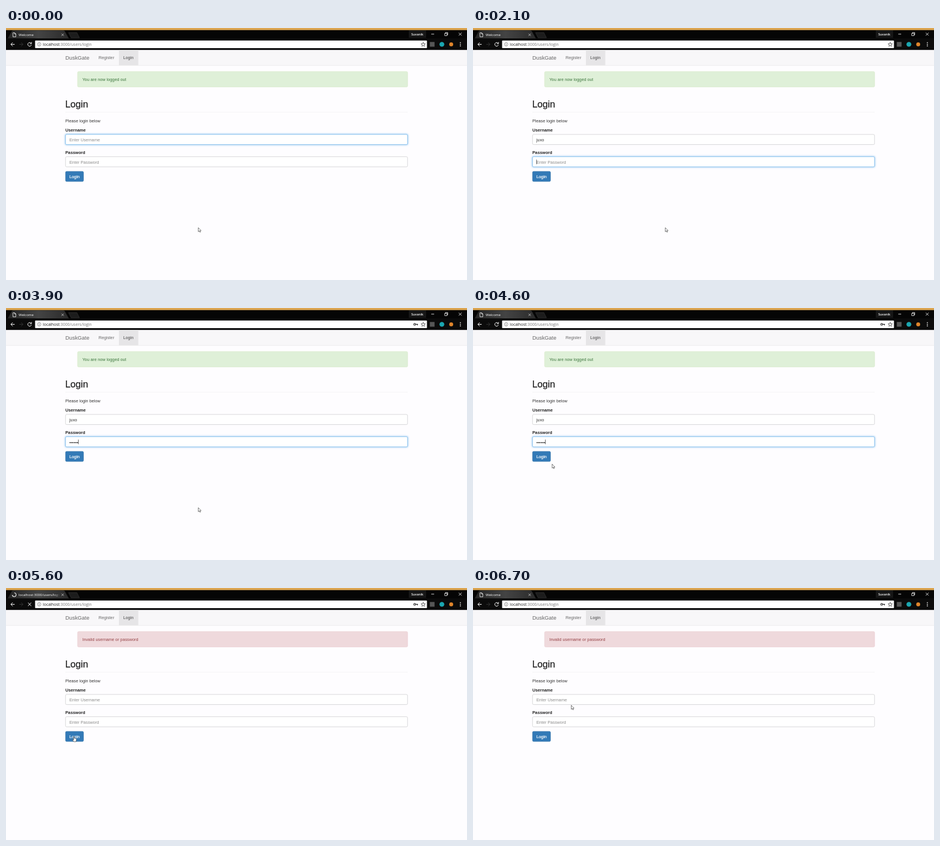
An HTML page that plays this animation: 800x438 px, repeating every 6800 ms.

```html
<!DOCTYPE html>
<html lang="en">
<head>
<meta charset="utf-8">
<title>Login form</title>
<style>
  html, body { margin: 0; width: 100%; height: 100%; overflow: hidden; background: #fefdff; }
  svg { display: block; width: 800px; height: 438px; }
  text { white-space: pre; }
  .page { font: 7.29px "Liberation Sans", Arial, sans-serif; fill: #333; }
  .ui { font: 6px "Open Sans", sans-serif; fill: #fff; }
  .bold { font-weight: bold; fill: #222; }
  .hint { fill: #8c8c8c; }
  .line { fill: none; stroke: #fff; stroke-width: 1; }
  .pointer { fill: #fff; stroke: #222; stroke-width: .6; stroke-linejoin: round; }
  .field { fill: #fff; stroke-width: .7; }
</style>
</head>
<body>
<svg viewBox="0 0 800 438">
  <defs>
    <linearGradient id="tabFill" x1="0" y1="0" x2="1" y2="0">
      <stop offset="0" stop-color="#242424"/><stop offset=".5" stop-color="#444"/><stop offset="1" stop-color="#2b2b2b"/>
    </linearGradient>
    <linearGradient id="fade" gradientUnits="userSpaceOnUse" x1="84" y1="0" x2="93" y2="0">
      <stop offset="0" stop-color="#fff"/><stop offset="1" stop-color="#fff" stop-opacity="0"/>
    </linearGradient>
    <filter id="blur" x="-5%" y="-50%" width="110%" height="200%"><feGaussianBlur stdDeviation="1.4"/></filter>
  </defs>

  <!-- browser window -->
  <rect width="800" height="438" fill="#fefdff"/>
  <rect width="800" height="38.3" fill="#050505"/>
  <rect width="800" height="3.7" fill="#dca550"/>
  <path d="M3 18 L10 5.5 Q11 4.3 13 4.3 H99 Q101 4.3 102 5.5 L109 18Z" fill="url(#tabFill)"/>
  <path d="M108.5 8 H123 L127.5 17 H113Z" fill="#1c1c1c" stroke="#3a3a3a" stroke-width=".6"/>
  <rect y="18" width="800" height="20.3" fill="#0b0b0b"/>
  <path id="doc" class="line" d="M12 8.3 H15 L17 10.3 V15.3 H12Z M15 8.3 V10.3 H17" style="stroke-width:.8"/>
  <circle id="spinner" class="line" cx="14.2" cy="11.7" r="3.3" stroke-dasharray="14.5 7"/>
  <text id="title" class="ui" x="22" y="14" style="fill:url(#fade)"></text>
  <path class="line" d="M96.3 9.8 l4 4 m0 -4 l-4 4" style="stroke:#ccc;stroke-width:.8"/>
  <rect x="699" y="4" width="30" height="13" fill="#171717"/>
  <text class="ui" x="703.3" y="12.7" style="font-size:5.5px;font-weight:600">Suvanik</text>
  <path class="line" d="M738 10.6 h5 M761.3 9.3 h4 v4 h-4Z M762.6 9.3 v-1.4 h4 v4 h-1.3 M785.7 8.2 l5 5 m0 -5 l-5 5" style="stroke-width:.8"/>

  <path class="line" d="M15 28.4 H8.6 M11.6 25.2 L8.4 28.4 L11.6 31.6"/>
  <path class="line" d="M23 28.4 H29.4 M26.4 25.2 L29.6 28.4 L26.4 31.6" style="stroke:#333"/>
  <path id="reload" class="line" d="M43.4 26.3 A3.2 3.2 0 1 0 44.1 29.3 M44.2 24.5 V27.3 H41.4"/>
  <path id="stop" class="line" d="M38.2 25.6 l5.6 5.6 m0 -5.6 l-5.6 5.6"/>
  <rect x="50.5" y="21.8" width="680" height="13.2" rx="1" fill="#fff"/>
  <circle cx="57.6" cy="28.4" r="3" fill="none" stroke="#666" stroke-width=".7"/>
  <path d="M57.6 26.5 v.8 M57.6 28 v2.1" stroke="#666" stroke-width=".8"/>
  <text class="ui" x="64" y="31" style="font-size:6.92px;fill:#777"><tspan fill="#222">localhost</tspan>:3000/users/login</text>
  <g id="key" fill="none" stroke="#333" stroke-width="1.2">
    <circle cx="709.2" cy="28.4" r="1.6"/><path d="M710.8 28.4 H715 M713.8 28.4 v1.8"/>
  </g>
  <path id="star" fill="none" stroke="#444" stroke-width=".8"/>
  <rect x="735.5" y="24.3" width="8.2" height="8.2" fill="#565656"/>
  <circle cx="756.4" cy="28.4" r="4.2" fill="#1ba6b0"/>
  <circle cx="772.6" cy="28.4" r="3.4" fill="#e0852b"/>
  <path d="M788.5 24.8 v1.5 m0 1.4 v1.5 m0 1.4 v1.5" stroke="#fff" stroke-width="1.5"/>

  <!-- web page -->
  <g class="page">
    <rect y="38.3" width="800" height="26.7" fill="#f8f7f9"/>
    <path d="M0 65.1 H800" stroke="#e5e4e6" stroke-width=".7"/>
    <rect x="196" y="38.3" width="33.6" height="26.5" fill="#e6e5e7"/>
    <text x="103" y="54.7" style="font-size:9.375px" fill="#666">DuskGate</text>
    <text x="160.7" y="54.2" fill="#666">Register</text>
    <text x="203.4" y="54.2" fill="#444">Login</text>

    <rect id="alert" x="124.2" y="75.7" width="572.8" height="26.8" rx="2" stroke-width=".6"/>
    <text id="message" x="132.4" y="91.7"></text>

    <text x="102.8" y="137.6" style="font-size:16.2px;stroke:#222;stroke-width:.25;fill:#222">Login</text>
    <path d="M103 146.2 H697" stroke="#ececee" stroke-width=".6"/>
    <text x="103" y="164.3">Please login below</text>
    <text class="bold" x="103" y="179.8">Username</text>
    <text class="bold" x="103" y="218.6">Password</text>
    <g id="fields"></g>

    <rect id="button" x="103.3" y="249.2" width="31.2" height="17.6" rx="2"/>
    <text x="110" y="260.8" style="fill:#fff;stroke:#fff;stroke-width:.2">Login</text>
  </g>

  <path id="arrow" class="pointer" d="M0 0 V7 L1.7 5.6 L2.8 8 L3.9 7.5 L2.8 5.2 H4.9Z"/>
  <path id="hand" class="pointer" d="M-.7 .6 Q0 -.4 .7 .6 V3.2 L3.6 3.9 Q4.4 4.2 4.2 5.4 L3.6 9 H-.4 L-2.8 5.8 Q-2.6 4.8 -1.6 5.4 L-.7 6.2Z"/>
</svg>

<script>
const LOOP = 6800, STEP = 100;
const USER = "juxo", PASSWORD_LENGTH = 6;
const $ = id => document.getElementById(id);
const clamp = v => Math.max(0, Math.min(1, v));
const ramp = (t, from, to) => clamp((t - from) / (to - from));
const show = (el, on) => el.setAttribute("visibility", on ? "visible" : "hidden");
const set = (el, attrs) => { for (const k in attrs) el.setAttribute(k, attrs[k]); };

function make(tag, attrs) {
  const el = document.createElementNS("http://www.w3.org/2000/svg", tag);
  set(el, attrs);
  return $("fields").appendChild(el);
}

function makeField(y, hint) {
  const box = { x: 103.3, y, width: 593.5, height: 17.6, rx: 2 };
  const glow = make("rect", { ...box, fill: "none", stroke: "#66afe9", "stroke-width": 2, filter: "url(#blur)" });
  const frame = make("rect", { ...box, class: "field" });
  const text = make("text", { x: 110, y: y + 12 });
  const caret = make("path", { stroke: "#222", "stroke-width": .7 });
  return (value, focus, caretOn) => {
    const mix = (a, b) => Math.round(a + (b - a) * focus);
    set(glow, { opacity: focus * focus * .7 });
    set(frame, { stroke: `rgb(${mix(200, 102)},${mix(200, 175)},${mix(202, 233)})` });
    text.textContent = value || hint;
    text.setAttribute("class", value ? "" : "hint");
    const x = 110.3 + (value ? text.getComputedTextLength() : 0);
    set(caret, { d: `M${x} ${y + 5} v8` });
    show(caret, caretOn);
  };
}

const username = makeField(185, "Enter Username");
const password = makeField(223.7, "Enter Password");

const starPoints = Array.from({ length: 10 }, (_, i) => {
  const r = i % 2 ? 1.7 : 3.9, a = i * Math.PI / 5;
  return [724 + r * Math.sin(a), 28.7 - r * Math.cos(a)];
});
$("star").setAttribute("d", "M" + starPoints.join("L") + "Z");

// pointer stops: time, x, y
const stops = [[3900, 333.7, 347], [4300, 195, 311], [4900, 118, 258], [6300, 118, 258], [6700, 170.5, 203.8]];

function pointerAt(t) {
  const i = stops.findIndex(s => s[0] > t);
  if (i < 1) return (i ? stops[stops.length - 1] : stops[0]).slice(1);
  const [a, b] = [stops[i - 1], stops[i]];
  const p = ramp(t, a[0], b[0]), e = i === 1 ? p : 1 - (1 - p) ** 2;
  return [a[1] + (b[1] - a[1]) * e, a[2] + (b[2] - a[2]) * e];
}

function draw(t) {
  const failed = t >= 5500, loading = t >= 5300 && t < 5900;

  // browser controls
  $("title").textContent = loading ? "localhost:3000/users/login" : "Welcome";
  show($("doc"), !loading);
  show($("spinner"), loading);
  set($("spinner"), { transform: `rotate(${(t - 5700) * .36 - 50} 14.2 11.7)` });
  show($("reload"), !loading);
  show($("stop"), loading);
  show($("key"), t >= 3700);

  // alert
  set($("alert"), failed ? { fill: "#efd9dc", stroke: "#e9cbd1" } : { fill: "#dff0d8", stroke: "#d6e9c6" });
  $("message").textContent = failed ? "Invalid username or password" : "You are now logged out";
  set($("message"), { style: `fill:${failed ? "#964246" : "#3c763d"}` });

  // form
  const typed = failed ? 0 : Math.floor(clamp((t - 100) / 400) * USER.length);
  const dots = failed ? 0 : Math.floor(clamp((t - 3000) / 600) * PASSWORD_LENGTH);
  const tabbed = ramp(t, 900, 1100), left = ramp(t, 5000, 5200);
  const blinkStart = t < 3000 ? 900 : Math.min(t, 3600);
  const blinkOn = (t - blinkStart) % 1000 < 500;
  username(USER.slice(0, typed), 1 - tabbed, t >= 200 && t < 900);
  password("•".repeat(dots), failed ? 0 : tabbed * (1 - left), t >= 900 && t < 5000 && blinkOn);

  // pointer and button
  const [x, y] = pointerAt(t);
  const over = x > 103 && x < 135 && y > 249 && y < 267;
  const pressed = t >= 5000 && t < 5300;
  const hover = over && !failed;
  set($("button"), {
    fill: pressed ? "#204d74" : hover ? "#286090" : "#337ab7",
    stroke: pressed ? "#5b9bd0" : hover ? "#204d74" : "#2e6da4",
    "stroke-width": pressed ? 1 : .6
  });
  for (const id of ["arrow", "hand"]) {
    set($(id), { transform: `translate(${x} ${y})` });
    show($(id), over === (id === "hand"));
  }
}

function tick() {
  const t = performance.now() % LOOP;
  draw(Math.floor(t / STEP) * STEP);
  requestAnimationFrame(tick);
}
tick();
</script>
</body>
</html>
```
